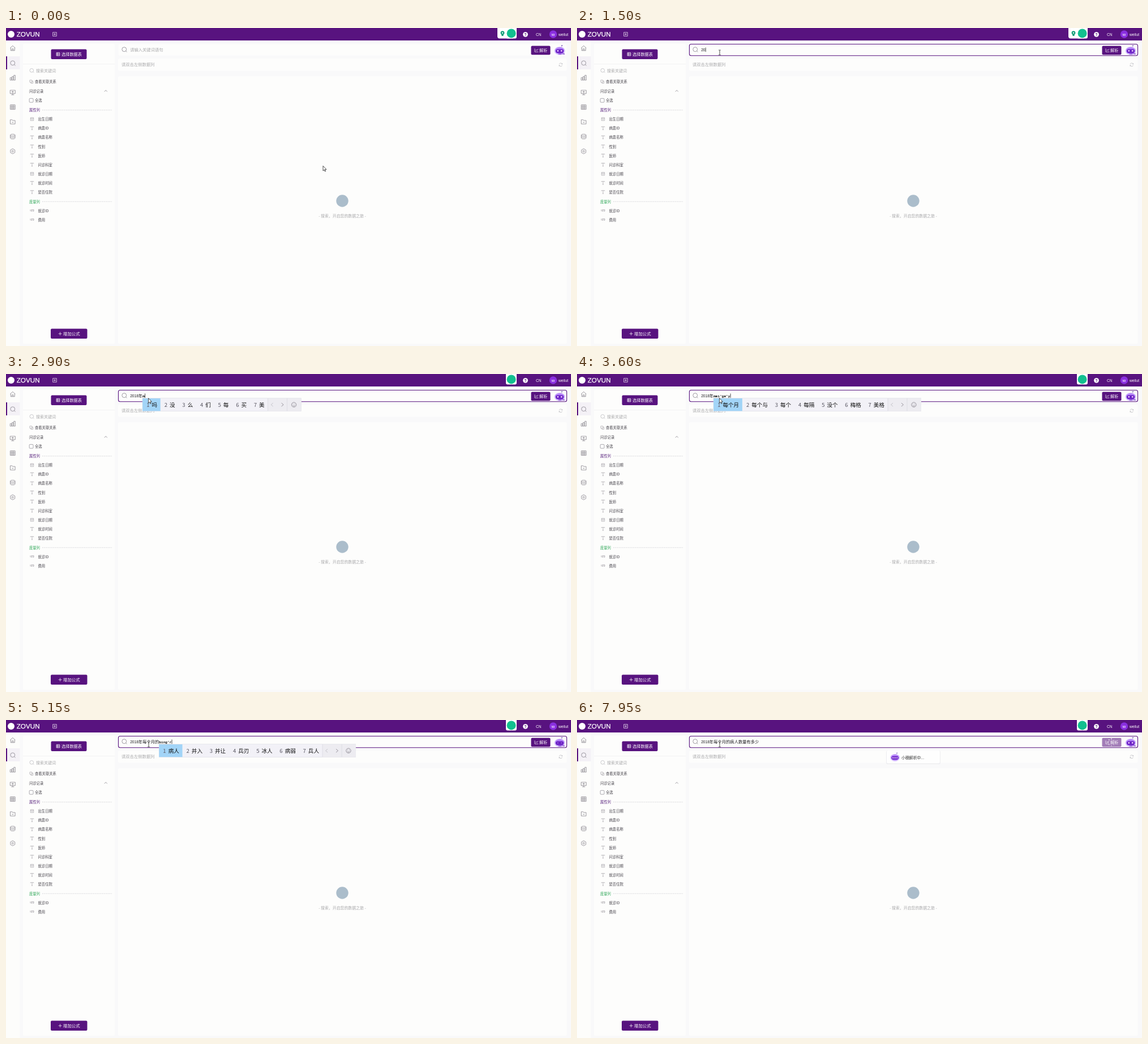
Write an HTML page that moves like this. It is 998 px wide and 561 px high and loops after 8000 ms.

```html
<!DOCTYPE html>
<html lang="zh-CN">
<head>
<meta charset="utf-8">
<title>数据搜索</title>
<style>
html, body { margin: 0; width: 100%; height: 100%; overflow: hidden; background: #f9f9fa; }
svg { display: block; width: 100vw; height: 100vh; }
text { font-family: "Noto Sans CJK SC", "Noto Sans CJK", sans-serif; white-space: pre; }
.latin { font-family: "Liberation Sans", sans-serif; }
.num { font-family: "Liberation Sans", sans-serif; font-size: 6.6px; }
.comp { font-family: "Liberation Mono", monospace; font-size: 6.1px; fill: #000; stroke: #000; stroke-width: .15; }
.icon { fill: none; stroke: #77737d; stroke-width: .7; }
.thin { stroke: #8d8a92; stroke-width: .55; }
.white { stroke: #fff; }
.pale { stroke: #b5b5ba; }
</style>
</head>
<body>
<svg id="stage" viewBox="0 0 998 561" preserveAspectRatio="none"></svg>
<script>
const LOOP = 8000;
const PURPLE = '#58137f', PAGE = '#f9f9fa', PANEL = '#fdfdfc', INK = '#45424a', MUTED = '#a9a9ab';
const EM = 7.3, HALF = 3.66, INPUT_X = 219.2;

const rect = (x, y, w, h, fill, r = 0, extra = '') =>
  `<rect x="${x}" y="${y}" width="${w}" height="${h}" rx="${r}" fill="${fill}" ${extra}/>`;
const circle = (x, y, r, fill) => `<circle cx="${x}" cy="${y}" r="${r}" fill="${fill}"/>`;
const text = (x, y, size, fill, str, extra = '') =>
  `<text x="${x}" y="${y}" font-size="${size}" fill="${fill}" ${extra}>${str}</text>`;
const icon = (x, y, d, cls = '') =>
  `<path class="icon ${cls}" transform="translate(${x} ${y})" d="${d}"/>`;
const ring = r => `M${-r} 0a${r} ${r} 0 1 0 ${2 * r} 0a${r} ${r} 0 1 0 ${-2 * r} 0`;

const shapes = {
  home: 'M-4.5 -.5L0 -4.5L4.5 -.5M-3.5 -1V4H3.5V-1M-1.2 4V1H1.2V4',
  search: ring(3.9) + 'M2.8 2.8L4.8 4.6',
  chart: 'M-4.5 4.3V0H-2V4.3ZM-1.2 4.3V-2H1.2V4.3ZM2 4.3V-4.3H4.5V4.3Z',
  board: 'M-4.5 -3.8H4.5V2H-4.5ZM0 2V4.2M-2.5 4.2H2.5M-2 -1H2M0 -2.6V.8',
  table: 'M-4.3 -4H4.3V4H-4.3ZM-4.3 -1.3H4.3M-4.3 1.4H4.3M-1.4 -4V4M1.4 -4V4',
  folder: 'M-4.3 3.7V-3.7H-1L0 -2.4H4.3V3.7ZM-1.5 .8H1.5',
  store: 'M-4.2 -2.6a4.2 1.6 0 1 0 8.4 0a4.2 1.6 0 1 0 -8.4 0V2.6a4.2 1.6 0 0 0 8.4 0V-2.6M-4.2 0a4.2 1.6 0 0 0 8.4 0',
  gear: 'M0 -4.5L3.9 -2.3V2.3L0 4.5L-3.9 2.3V-2.3Z' + ring(1.5),
  date: 'M-2.7 -2.5H2.7V2.7H-2.7ZM-2.7 -.9H2.7M-1.2 .9H1.2',
  word: 'M-2.8 -1.7V-2.7H2.8V-1.7M0 -2.7V2.7M-1.2 2.7H1.2',
  measure: 'M-3 -1.8V1.3M-1.6 -1.6H.4V-.2H-1.4V1.3H.4M1.2 -1.6H3V1.3H1.2M1.5 -.2H3',
  links: 'M-2.8 -2.8H1V1H-2.8ZM-.8 1V2.8H2.8V-1H1',
  plus: 'M-3 0H3M0 -3V3',
  trend: 'M-3 -3V2.8H3.3M-1.7 .8L0 -1L1 .2L3 -2.2',
  refresh: 'M2.8 -1A3 3 0 0 0 -2.8 -1M-2.8 1A3 3 0 0 0 2.8 1M2.8 -2.6V-.9H1.2M-2.8 2.6V.9H-1.2'
};

function robot(x, y, scale, face) {
  return `<g transform="translate(${x} ${y}) scale(${scale})">
    <path d="M2.5 -6L4 -9" stroke="#8f78bd" stroke-width=".6"/>${circle(4, -9.3, .9, '#6440a8')}
    <ellipse rx="9.7" ry="7.4" fill="#dccbfc"/><ellipse cy="-.3" rx="8" ry="6.2" fill="#b583f8"/>
    <rect x="-7" y="-2.8" width="14" height="6.6" rx="3.3" fill="#6a22c4"/>${face}</g>`;
}
const eyes = `<g id="eyes">${circle(-3.2, 0, 1.4, '#f3d0ff')}${circle(3.2, 0, 1.4, '#f3d0ff')}</g>`;
const dots = [-4.5, -1.5, 1.5, 4.5].map(x => circle(x, .4, 1.1, '#f5e7ff')).join('');

function header() {
  return rect(0, 0, 998, 22, PURPLE) + circle(9, 11, 6, '#fff')
    + text(18.7, 15.3, 11.7, '#fff', 'ZOVUN', 'class="latin" stroke="#fff" stroke-width=".25"')
    + icon(86, 11, 'M-3.3 -3.3H3.3V3.3H-3.3ZM-1.8 0H1.8M0 -1.8V1.8', 'white')
    + `<g id="tip">${rect(868, -4, 30, 22.5, '#fff', 4)}${circle(877, 8.6, 3.4, '#0f9d78')}
       ${rect(875.4, 11, 3.2, 3, '#0f9d78', .6)}${circle(877, 8.6, 1.2, '#fff')}</g>`
    + rect(883, -4, 19, 22.5, '#fff', 3) + circle(892.6, 9.4, 8, '#12bf8f')
    + circle(917.5, 11.3, 4.4, '#fff')
    + text(917.5, 13.9, 7, PURPLE, '?', 'class="latin" text-anchor="middle" font-weight="bold"')
    + text(936, 13.7, 6.6, '#fff', 'CN', 'class="latin"')
    + circle(966.5, 11, 6.7, '#8a2fe0')
    + text(966.5, 13.6, 8, '#fff', 'w', 'class="latin" text-anchor="middle"')
    + text(976, 13.5, 6.7, '#fff', 'weilut', 'class="latin"');
}

function navigation() {
  const names = ['home', 'search', 'chart', 'board', 'table', 'folder', 'store', 'gear'];
  return rect(0, 22, 24.5, 539, '#fdfdfb') + rect(0, 50, 24.5, 23, '#f4f1f6') + rect(0, 50, 2, 23, PURPLE)
    + names.map((n, i) => icon(11.8, 35.8 + i * 25.95, shapes[n])).join('');
}

function columnList(top, title, color, items) {
  const rule = `<path d="M64 ${top}H187" stroke="#c6c6cc" stroke-width=".7" stroke-dasharray="2 1.2"/>`;
  return text(41, top + 2.3, 6.3, color, title) + rule + items.map(([kind, label], i) => {
    const y = top + 16.1 * (i + 1);
    return icon(46, y - .3, shapes[kind], 'thin') + text(56.5, y + 2.3, 6.35, INK, label);
  }).join('');
}

function sidebar() {
  const fields = [['date', '出生日期'], ['word', '病患ID'], ['word', '病患名称'], ['word', '性别'], ['word', '医师'],
    ['word', '问诊科室'], ['date', '就诊日期'], ['word', '就诊时间'], ['word', '是否住院']];
  return rect(30, 28, 162, 529, PANEL, 2)
    + rect(79.5, 37.5, 63, 17.5, PURPLE, 2)
    + icon(92, 46.2, 'M-2.9 -2.8H2.9V2.8H-2.9ZM-2.9 -.9H2.9M-2.9 1H2.9M-1 -2.8V2.8', 'white')
    + text(98, 49, 7.2, '#fff', '选择数据表')
    + rect(30, 63.4, 162, .7, '#eeeef0')
    + icon(45.3, 74.8, ring(3.3) + 'M2.4 2.4L4 4', 'pale') + text(53, 77.5, 7, MUTED, '搜索关键词')
    + icon(44.8, 94.7, shapes.links, 'thin') + text(51, 97, 6.3, INK, '查看关联关系')
    + text(41, 113.5, 6.3, INK, '问诊记录') + icon(176.3, 111, 'M-2.5 1.2L0 -1.2L2.5 1.2')
    + rect(41.2, 124.3, 6.8, 6.8, '#fff', 1, 'stroke="#85828a" stroke-width=".7"')
    + text(51, 130.4, 6.3, INK, '全选')
    + columnList(144.8, '属性列', '#58237d', fields)
    + columnList(306.2, '度量列', '#2fa758', [['measure', '就诊ID'], ['measure', '费用']])
    + rect(79, 530.5, 64.5, 17.5, PURPLE, 2) + icon(95.6, 539.3, shapes.plus, 'white')
    + text(101, 542, 7.4, '#fff', '增加公式');
}

function workspace() {
  return rect(198.5, 28.5, 792, 20.3, PANEL, 3, 'id="box" stroke-width="1.1"')
    + icon(208.8, 37.7, shapes.search)
    + text(INPUT_X, 41, EM, MUTED, '请输入关键词语句', 'id="hint"')
    + text(INPUT_X, 41, EM, '#1f1e22', '', 'id="query"')
    + '<path id="underline" stroke="#333" stroke-width=".6" stroke-dasharray="1 .8"/>'
    + rect(0, 34.5, .8, 7.6, '#222', 0, 'id="caret"')
    + `<g id="parse">${rect(927.5, 31.5, 34, 15.8, PURPLE, 2)}${icon(937, 39.3, shapes.trend, 'white')}
       ${text(942, 42, 7.2, '#fff', '解析')}</g>`
    + `<g id="spinner">${Array.from({ length: 8 }, (_, i) => {
        const a = i * Math.PI / 4;
        return circle(944 + 6 * Math.cos(a), 39.3 + 6 * Math.sin(a), 1, `rgba(255,255,255,${.2 + i * .09})`);
      }).join('')}</g>`
    + robot(978, 40.3, 1, eyes)
    + text(981.5, 47, 4.2, '#7a35c8', 'BETA', 'class="latin" font-weight="bold" text-anchor="middle"')
    + rect(198, 54, 792.5, 21.3, PANEL, 2) + text(204, 67.3, EM, MUTED, '请双击左侧数据列')
    + icon(979.8, 64.8, shapes.refresh, 'pale')
    + rect(198, 85, 792.5, 472, PANEL, 2) + circle(594, 305, 10.7, '#abbdcb')
    + text(594, 334.2, 6.9, MUTED, '- 搜索，开启您的数据之旅 -', 'text-anchor="middle"');
}

function notice() {
  return `<g id="notice">${rect(546, 54, 96, 24, '#ededf0', 3)}${rect(547, 53.7, 94, 22.8, '#fefefe', 2.5)}
    ${robot(561.7, 66.4, .88, dots)}${text(573, 69, 6.9, '#333', '小穗解析中...')}</g>`;
}

const stage = document.getElementById('stage');
stage.innerHTML = rect(0, 0, 998, 561, PAGE) + header() + navigation() + sidebar() + workspace()
  + notice() + '<g id="popup"></g>'
  + '<path id="arrow" d="M0 0V8.6L2 6.8L3.4 9.8L4.7 9.2L3.3 6.3H6Z" fill="#fff" stroke="#222" stroke-width=".8"/>'
  + '<path id="beam" d="M-1.8 -4.2H-.5L0 -3.8L.5 -4.2H1.8M0 -3.8V3.8M-1.8 4.2H-.5L0 3.8L.5 4.2H1.8" fill="none" stroke="#222" stroke-width=".8"/>';
const el = Object.fromEntries([...stage.querySelectorAll('[id]')].map(n => [n.id, n]));
const show = (node, on) => node.setAttribute('visibility', on ? 'visible' : 'hidden');

// time, committed text, text being composed, candidates (kept while composing)
const MONTH = '2018年每个月', OF = MONTH + '的', COUNT = OF + '病人数量';
const steps = [
  [0, ''], [1300, '2'], [1450, '20'], [1650, '201'], [1850, '2018'],
  [2200, '2018', 'n'], [2300, '2018', 'n', '年 你 那 呢 能 哪 内'], [2650, '2018年'],
  [2900, '2018年', 'm', '吗 没 么 们 每 买 美'], [3000, '2018年', 'me'],
  [3100, '2018年', 'mei', '没 每 美 妹 梅 眉 煤'], [3250, '2018年', "mei'g", '每个 没 每 美 梅 妹 眉'],
  [3400, '2018年', "mei'ge", '每个 每隔 没个 梅格 美格 没 每'],
  [3550, '2018年', "mei'ge'y", '每个月 每个与 每个 每隔 没个 梅格 美格'],
  [3700, '2018年', "mei'ge'yu", '每个与 每个月 每个 每隔 没个 梅格 美格'],
  [3800, '2018年', "mei'ge'yue", '每个月 每个约 每个 每隔 没个 梅格 美格'], [4000, MONTH],
  [4250, MONTH, 'd', '的 到 都 大 对 等 点'], [4350, MONTH, 'de', '的 得 德 地 嘚 锝 底'], [4550, OF],
  [4700, OF, 'b', '不 把 被 吧 本 别 比'], [4800, OF, 'bi'], [4875, OF, 'bin'],
  [4950, OF, 'bing', '并 病 冰 兵 饼 丙 秉'],
  [5100, OF, "bing'r", '病人 并入 并让 兵刃 冰人 病弱 兵人'], [5250, OF, "bing're"],
  [5350, OF, "bing'ren", '病人 兵刃 冰人 兵人 冰刃 并 病'],
  [5500, OF, "bing'ren's", '病人数 病人 兵刃 冰人 兵人 冰刃 并'], [5600, OF, "bing'ren'sh"],
  [5700, OF, "bing'ren'shu"], [5825, OF, "bing'ren'shu'l", '病人数量 病人数 病人 兵刃 冰人 兵人 冰刃'],
  [5925, OF, "bing'ren'shu'li"], [6025, OF, "bing'ren'shu'lia"],
  [6100, OF, "bing'ren'shu'lian", '病人熟练 病人数 病人 兵刃 冰人 兵人 冰刃'],
  [6225, OF, "bing'ren'shu'liang", '病人数量 病人数 病人 兵刃 冰人 兵人 冰刃'], [6400, COUNT],
  [6550, COUNT, 'y', '有 一 也 要 与 又 用'], [6650, COUNT, 'yo'], [6725, COUNT, 'you', '有 又 由 游 右 油 友'],
  [6825, COUNT, "you'd", '有的 有点 有 又 由 右 油'], [6925, COUNT, "you'du"],
  [7050, COUNT, "you'duo", '有多 又多 有 又 由 右 油'],
  [7125, COUNT, "you'duo's", '有多少 有多 又多 有 又 由 右'], [7200, COUNT, "you'duo'sh"],
  [7275, COUNT, "you'duo'sha"], [7350, COUNT, "you'duo'shao"], [7450, COUNT + '有多少']
];
steps.forEach((s, i) => { s[3] ??= s[2] ? steps[i - 1][3] : ''; });

function candidateBar(left, list) {
  let x = left, items = '';
  list.split(' ').forEach((word, i) => {
    const w = 22 + 9.6 * word.length;
    if (!i) items += rect(x, 43, w, 22.3, '#a2d4f7');
    items += text(x + 7, 57.5, 9.6, '#5b5965', i + 1) + text(x + 16.3, 57.5, 9.6, '#111', word);
    x += w;
  });
  return rect(left, 42.7, x - left + 59, 22.8, '#f2f1f7', 0, 'stroke="#dddde4" stroke-width=".6"')
    + rect(x, 43, 59, 22.3, '#edecf1') + items
    + rect(x, 43, .6, 22.3, '#d6d5dc') + rect(x + 34, 43, .6, 22.3, '#d6d5dc')
    + icon(x + 7.6, 54.2, 'M1.8 -3L-1.8 0L1.8 3', 'pale')
    + `<g style="--ink:#333">${icon(x + 26, 54.2, 'M-1.8 -3L1.8 0L-1.8 3')}</g>`
    + icon(x + 46.2, 54.2, ring(4.2) + 'M-2.2 1A2.4 2.4 0 0 0 2.2 1M-1.6 -1.8V-.7M1.6 -1.8V-.7');
}

let current = null;
function setInput(step) {
  if (step === current) return;
  current = step;
  const [, done, comp = '', list] = step;
  const digits = done.match(/^\d*/)[0];
  const start = INPUT_X + digits.length * HALF + (done.length - digits.length) * EM;
  const end = start + comp.length * HALF;
  el.query.innerHTML = `<tspan class="num">${digits}</tspan>${done.slice(digits.length)}<tspan class="comp">${comp}</tspan>`;
  el.underline.setAttribute('d', comp ? `M${start} 42.6H${end}` : '');
  el.caret.setAttribute('x', end + .3);
  el.popup.innerHTML = list ? candidateBar(start, list) : '';
  show(el.hint, !done);
}

const between = (t, a, b) => t >= a && t < b;
const ease = p => p * p * (3 - 2 * p);

function draw(t) {
  setInput(steps.findLast(s => s[0] <= t));
  const focused = t >= 1000;
  el.box.setAttribute('stroke', focused ? PURPLE : 'none');
  show(el.caret, between(t, 1000, 7600));
  show(el.tip, t < 2900);

  const p = ease(Math.min(1, Math.max(0, (t - 100) / 800)));
  const x = 560 - 308.5 * p, y = 243.3 - 200.6 * p;
  const arrow = y > 47 || between(t, 2200, 2650) || between(t, 2900, 4000);
  show(el.arrow, arrow);
  show(el.beam, !arrow);
  el.arrow.setAttribute('transform', `translate(${x} ${y})`);
  el.beam.setAttribute('transform', `translate(${x + .5} ${y + .5})`);

  const blink = between(t % 2600, 2400, 2600) && t < 7000;
  el.eyes.setAttribute('transform', `scale(1 ${blink ? .25 : 1})`);

  const parsing = t >= 7600;
  el.parse.setAttribute('opacity', parsing ? 1 - .45 * Math.min(1, (t - 7600) / 200) : 1);
  show(el.spinner, parsing);
  el.spinner.setAttribute('transform', `rotate(${Math.floor(t / 100) * 45} 944 39.3)`);
  show(el.notice, t >= 7650);
}

function tick() {
  draw(performance.now() % LOOP);
  requestAnimationFrame(tick);
}
tick();
</script>
</body>
</html>
```
